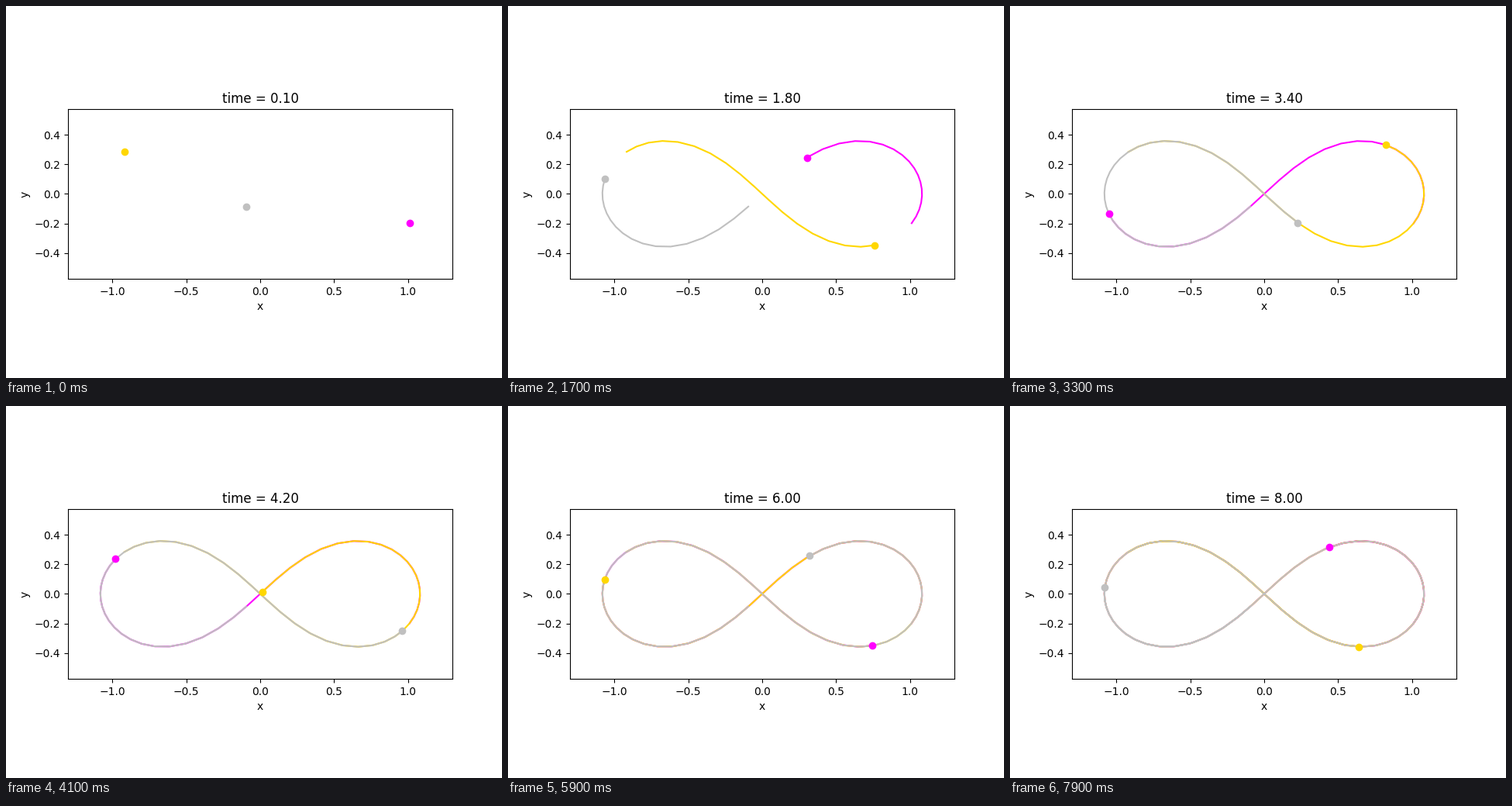
Recreate the animation shown at these times as a matplotlib script. Size 640 px wide and 480 px high, loop 8000 ms.

```python
import numpy as np
import matplotlib.pyplot as plt
from matplotlib.animation import FuncAnimation

FRAMES = 80
DT = 0.1        # simulated time per frame
SUBSTEPS = 50   # integration steps per frame
COLORS = ("magenta", "gold", "silver")


def acceleration(pos):
    """Gravity between equal unit masses, with G = 1."""
    sep = pos[None, :, :] - pos[:, None, :]
    dist = np.linalg.norm(sep, axis=2)
    np.fill_diagonal(dist, 1.0)
    return (sep / dist[:, :, None] ** 3).sum(axis=1)


def derivative(state):
    pos, vel = state
    return np.array([vel, acceleration(pos)])


def rk4_step(state, h):
    k1 = derivative(state)
    k2 = derivative(state + h / 2 * k1)
    k3 = derivative(state + h / 2 * k2)
    k4 = derivative(state + h * k3)
    return state + h / 6 * (k1 + 2 * k2 + 2 * k3 + k4)


def simulate():
    """Positions of the figure-eight orbit, shape (FRAMES, 3, 2)."""
    r = np.array([0.97000436, -0.24308753])
    v = np.array([0.46620368, 0.43236573])
    state = np.array([[r, -r, 0 * r], [v, v, -2 * v]])
    track = []
    for _ in range(FRAMES):
        for _ in range(SUBSTEPS):
            state = rk4_step(state, DT / SUBSTEPS)
        track.append(state[0])
    return np.array(track)


track = simulate()

fig, ax = plt.subplots(figsize=(6.4, 4.8), dpi=100)
ax.set_aspect("equal")
ax.set_xlim(-1.3, 1.3)
ax.set_ylim(-0.574, 0.574)
ax.set_xticks(np.linspace(-1, 1, 5))
ax.set_yticks(np.linspace(-0.4, 0.4, 5))
ax.set_xlabel("x")
ax.set_ylabel("y")
title = ax.set_title("")

trails = [ax.plot([], [], color=c)[0] for c in COLORS]
bodies = [ax.plot([], [], "o", color=c)[0] for c in COLORS]


def update(i):
    for k, (trail, body) in enumerate(zip(trails, bodies)):
        path = track[: i + 1, k]
        trail.set_data(path[:, 0], path[:, 1])
        body.set_data(path[-1:, 0], path[-1:, 1])
    title.set_text(f"time = {(i + 1) * DT:.2f}")
    return trails + bodies + [title]


anim = FuncAnimation(fig, update, frames=FRAMES, interval=100,
                     repeat=True, repeat_delay=0, blit=False)
plt.show()
```
